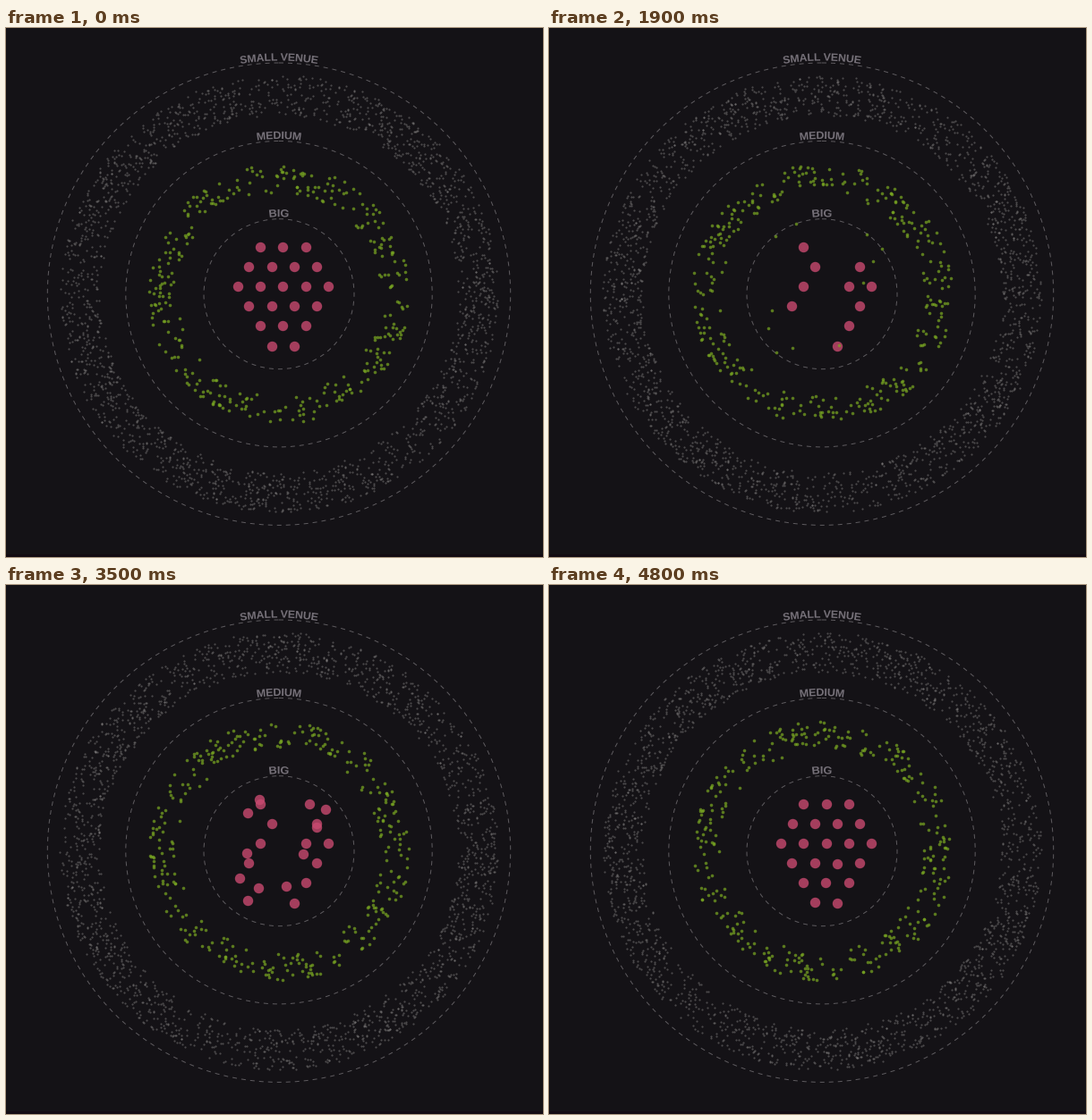
Recreate the animation shown at these times as a matplotlib script. Size 600x592 px, loop 4900 ms.

```python
import numpy as np
import matplotlib.pyplot as plt
from matplotlib.animation import FuncAnimation
from matplotlib.colors import to_rgba
from matplotlib.patches import Circle, PathPatch, Rectangle
from matplotlib.path import Path
from matplotlib.textpath import TextPath

W, H, DPI = 600, 592, 100
FRAMES, STEP = 49, 100
CENTER = np.array([305, 297.7])
BG, LINE, LABEL = "#141216", "#5e5b5f", "#757078"
PINK, GREEN, GREY = "#c94a70cc", "#7aa822b4", "#8f8c8c74"
R_PINK, R_GREEN, R_GREY = 5.7, 1.8, 1.1
SPIN = np.radians(16.5)                  # ring rotation per second
LEAVE, RETURN, DECAY = 0.2, 3.2, 3.65    # seconds, seconds, 1/second

rng = np.random.default_rng(7)

fig = plt.figure(figsize=(W / DPI, H / DPI), dpi=DPI, facecolor=BG)
ax = fig.add_axes([0, 0, 1, 1])
ax.set(xlim=(0, W), ylim=(H, 0))
ax.axis("off")


def area(radius):
    """Scatter size for a radius in pixels."""
    return (2 * radius * 72 / DPI) ** 2


def polar(r, a):
    return np.column_stack([r * np.cos(a), r * np.sin(a)])


def dots(offsets, radius, color, z):
    return ax.scatter(*(CENTER + offsets).T, s=area(radius), c=[to_rgba(color)],
                      linewidths=0, zorder=z)


def venue_ring(radius, label):
    ax.add_patch(Circle(CENTER, radius, fill=False, ec=LINE, lw=0.72,
                        ls=(0, (5, 5)), capstyle="butt"))
    text = TextPath((0, 0), label, size=12,
                    prop={"family": "Liberation Sans", "weight": "bold"})
    box = text.get_extents()
    x, y = text.vertices.T
    a = (x - (box.x0 + box.x1) / 2) / radius - np.pi / 2
    bent = CENTER + polar(radius + 2.5 + y, a)
    ax.add_patch(PathPatch(Path(bent, text.codes), fc=LABEL, lw=0))


def scatter_ring(n, inner, outer, clumps, share):
    """Random radii, angles and speeds, with some dots drawn to clumps."""
    r = np.sqrt(rng.uniform(inner ** 2, outer ** 2, n))
    a = rng.uniform(0, 2 * np.pi, n)
    k = int(n * share)
    a[:k] = np.radians(rng.choice(clumps, k) + rng.normal(0, 8, k))
    return r, a, SPIN * rng.normal(1, 0.03, n)


for radius, label in ((258.7, "SMALL VENUE"), (171.2, "MEDIUM"), (84, "BIG")):
    venue_ring(radius, label)
ax.add_patch(Rectangle((0, 589), W, 3, fc="#120b12", lw=0))

small = scatter_ring(2000, 200, 245, [-150, -55, 5, 110, 160], 0.08)
medium = scatter_ring(330, 114, 145.5, [-72, -32, 30, 121, 178], 0.22)

# Hexagonal cluster of big venues
grid = np.array([(309.4 + 25.3 * (i - (n - 1) / 2), 245 + 22.1 * row)
                 for row, n in enumerate((3, 4, 5, 4, 3, 2))
                 for i in range(n)]) - CENTER
movers = [1, 2, 3, 5, 7, 9, 13, 14, 16, 17, 19]
home = grid[movers]
away = np.array([(74, -62), (83, -44), (-15, -98), (76, -30), (-36, -91), (63, 5),
                 (-77, 2), (7, 76), (-77, 30), (-57, 59), (-71, 60)])
r0, r1 = np.hypot(*home.T), np.hypot(*away.T)
a0 = np.arctan2(home[:, 1], home[:, 0])
turn = (np.arctan2(away[:, 1], away[:, 0]) - a0) % (2 * np.pi)

small_dots = dots(polar(*small[:2]), R_GREY, GREY, 2)
medium_dots = dots(polar(*medium[:2]), R_GREEN, GREEN, 3)
dots(np.delete(grid, movers, axis=0), R_PINK, PINK, 4)
mover_dots = dots(home, R_PINK, PINK, 5)


def spiral(t):
    s = max(0, (t - LEAVE) / 2.4)
    return polar(r0 + (r1 - r0) * s, a0 + turn * s)


def mover_offsets(t):
    if t < RETURN:
        return spiral(t)
    return home + (spiral(RETURN) - home) * np.exp(-DECAY * (t - RETURN))


def update(i):
    t = i * STEP / 1000
    for ring, art in ((small, small_dots), (medium, medium_dots)):
        r, a, speed = ring
        art.set_offsets(CENTER + polar(r, a + speed * t))

    mix = np.interp(t, [LEAVE, LEAVE + 0.2, RETURN, RETURN + 0.2], [0, 1, 1, 0])
    color = (1 - mix) * np.array(to_rgba(PINK)) + mix * np.array(to_rgba(GREEN))
    mover_dots.set_offsets(CENTER + mover_offsets(t))
    mover_dots.set_sizes([area(R_PINK + (R_GREEN - R_PINK) * mix)])
    mover_dots.set_facecolor([color])
    return small_dots, medium_dots, mover_dots


anim = FuncAnimation(fig, update, frames=FRAMES, interval=STEP, repeat=True,
                     repeat_delay=0, blit=False)
plt.show()
```
